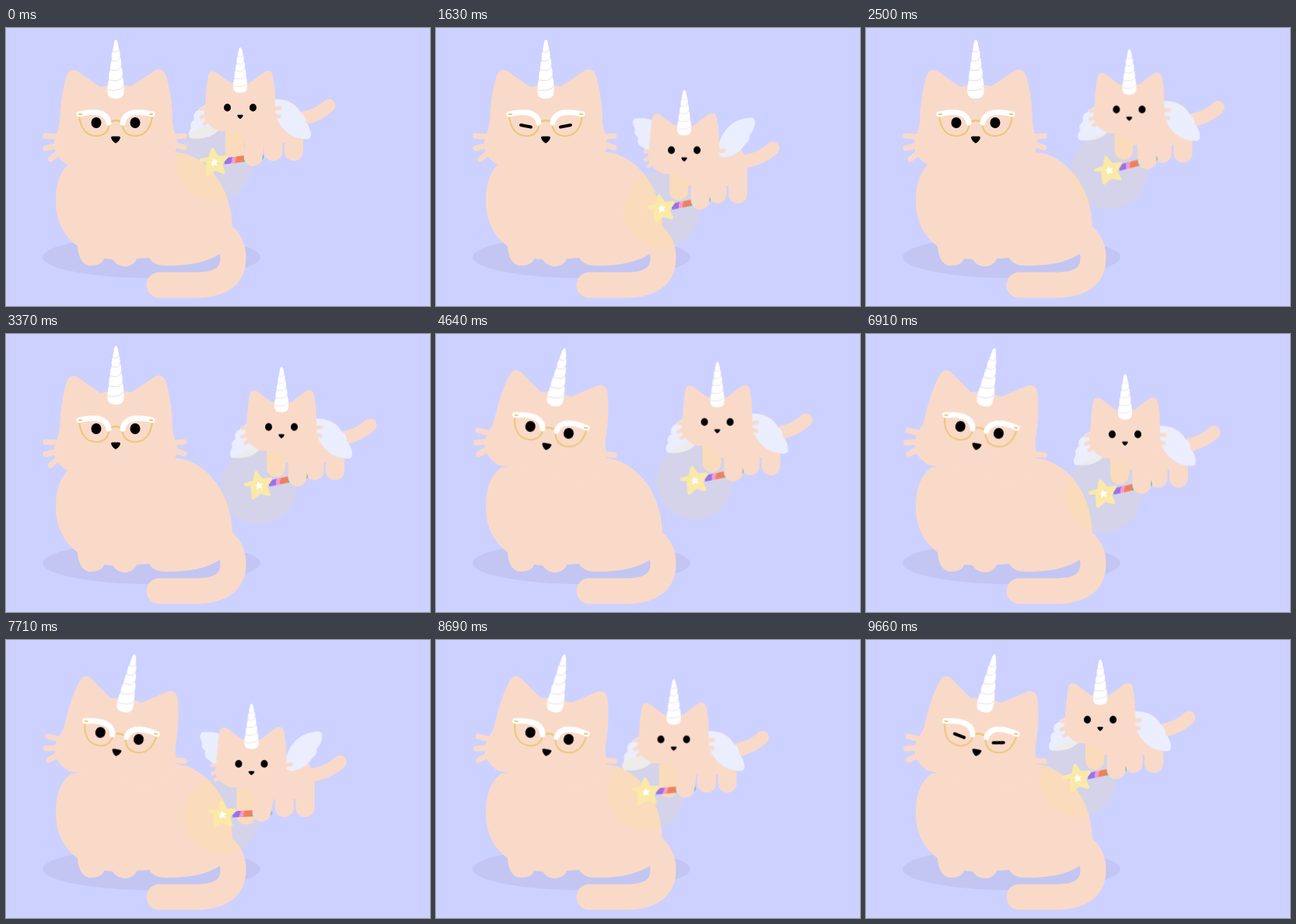
Animation of 545x358 px, one loop 9.76 s. Source, as an HTML page without scripts:

```html
<!DOCTYPE html>
<html lang="en">
<head>
<meta charset="utf-8">
<title>Two unicorn cats</title>
<style>
@property --swing { syntax: "<number>"; inherits: true; initial-value: 0; }
@property --shut { syntax: "<number>"; inherits: true; initial-value: 0; }

html, body { margin: 0; width: 100%; height: 100%; overflow: hidden; background: #cdd1ff; }
svg { display: block; width: 100%; height: 100%; }

.fur { fill: #f9dac9; }
.limb { fill: none; stroke: #f9dac9; stroke-linecap: round; }
.wing { fill: #eaeeff; transform-origin: 301px 102px; animation: flap 1.22s linear infinite; }
.gold { fill: none; stroke: #ebc875; stroke-width: 2.2; }
.brow { fill: none; stroke: #fff; stroke-width: 7; stroke-linecap: round; }
.lid { stroke: #000; stroke-linecap: round; }

.open { opacity: calc(1 - var(--shut)); }
.shut { opacity: var(--shut); }

.head { transform-origin: 135px 150px; animation: tilt 9.76s step-end infinite; }
.big-eyes { animation: blink 9.76s step-end infinite; }
.small-eyes { animation: small-blink 2.44s step-end infinite; }
.drift { animation: drift 9.76s linear infinite; }
.bob { animation: bob 9.76s cubic-bezier(.37, 0, .63, 1) infinite; }
.waver { animation: swing 9.76s cubic-bezier(.37, 0, .63, 1) infinite; }
.arm { transform-origin: 331px 119px; transform: rotate(calc(var(--swing) * 1deg)); }
.leg { transform: translateY(calc(max(0, var(--swing)) * 1.5px)); }

@keyframes tilt {
  0% { transform: none; }
  37.7%, 100% { transform: rotate(10.3deg); }
}
@keyframes blink {
  0%, 6.5%, 18.2%, 30%, 41.7%, 53.5%, 65.2%, 77%, 88.7% { --shut: 0; }
  4.1%, 15.9%, 27.6%, 39.4%, 51.1%, 62.9%, 74.6%, 86.4%, 98.1%, 100% { --shut: 1; }
}
@keyframes small-blink {
  0%, 55%, 100% { --shut: 0; }
  46% { --shut: 1; }
}
@keyframes drift {
  0%, 99%, 100% { transform: none; }
  5.1% { transform: translateX(.5px); }
  10% { transform: translateX(2px); }
  13.3% { transform: translateX(8px); }
  16.7% { transform: translateX(18px); }
  20.5% { transform: translateX(27px); }
  30.4% { transform: translateX(47px); }
  34.5% { transform: translateX(53px); }
  40.6% { transform: translateX(57.5px); }
  47.5% { transform: translateX(60.5px); }
  51.2% { transform: translateX(61.5px); }
  56.4% { transform: translateX(60px); }
  62.5% { transform: translateX(54px); }
  71.9% { transform: translateX(29px); }
  79% { transform: translateX(14.5px); }
  82% { transform: translateX(10.5px); }
  92% { transform: translateX(2px); }
}
@keyframes bob {
  0%, .3%, 12.7%, 25%, 37.4%, 49.8%, 62.1%, 74.5%, 86.9%, 99.2%, 100% { transform: none; }
  4.9%, 17.3%, 29.7%, 42%, 54.4%, 66.8%, 79.1%, 91.5% { transform: translateY(57px); }
}
@keyframes flap {
  0%, 15%, 59%, 100% { transform: none; }
  23%, 51% { transform: scaleY(-1); }
}
@keyframes swing {
  0% { --swing: 4.5; }
  5% { --swing: 10; }
  13%, 17.3%, 34.5%, 47.5%, 62.5%, 73%, 85%, 99%, 100% { --swing: 0; }
  29.7%, 66.8% { --swing: -4; }
  42% { --swing: -2; }
  54.4%, 79% { --swing: 9; }
  91.5% { --swing: 10; }
}
</style>
</head>
<body>
<svg viewBox="0 0 545 358">
  <defs>
    <!-- horn, tip at the origin -->
    <g id="horn">
      <path fill="#fff" d="M-2 3Q0-3 2.500 3L4.500 13Q6 17 5.500 22Q8 28 7 34Q9.500 41 8.500 47Q11 54 10.500 64Q12 76 0 76Q-12 76-10.500 64Q-10.500 56-8.500 51Q-9.500 45-7 38Q-7.500 32-5 26Q-6 20-4 15Z"/>
      <path fill="none" stroke="#dfe0f2" d="M-4 15Q3 18 4.500 12M-5 27Q4 30 5.500 22M-7 39Q5 42 7 34M-8.500 52Q6 55 8.500 47M-10 65Q8 67 10 59"/>
    </g>
    <path id="nose" d="M-6-3Q-6-5-3-4.500H3Q6-5 6-3Q5 2 0 4.500Q-5 2-6-3Z"/>
    <path id="star" d="M0-17L5-6L16.500-5L8 3L10.500 14L0 8.500L-10.500 14L-8-3L-16.500-5L-5-6Z"/>
    <linearGradient id="rainbow" gradientUnits="userSpaceOnUse" x1="0" y1="0" x2="33" y2="12">
      <stop offset=".14" stop-color="#62b99c"/>
      <stop offset=".14" stop-color="#6683e6"/>
      <stop offset=".36" stop-color="#6683e6"/>
      <stop offset=".36" stop-color="#9b72ea"/>
      <stop offset=".58" stop-color="#9b72ea"/>
      <stop offset=".58" stop-color="#f49acb"/>
      <stop offset=".72" stop-color="#f49acb"/>
      <stop offset=".72" stop-color="#f0805c"/>
      <stop offset="1" stop-color="#f0805c"/>
      <stop offset="1" stop-color="#62b99c"/>
    </linearGradient>
  </defs>

  <rect width="545" height="358" fill="#cdd1ff"/>
  <ellipse cx="187" cy="295" rx="140" ry="27" fill="#c3c6f2"/>

  <!-- big cat -->
  <path class="limb" stroke-width="33" d="M197 331H245C276 331 292 319 292 296C292 284 288 275 280 268"/>
  <path class="fur" d="M84 172C70 182 64 200 64 222C64 248 74 268 92 281C93 296 99 306 109 306C119 306 125 302 126 297L137 298C140 303 146 307 153 307C160 307 166 303 168 297L184 296C188 303 196 306 205 306C236 306 258 302 276 290L291 262C292 200 252 162 219 160Z"/>
  <g class="head">
    <path class="fur" d="M84 178C70 172 62 163 62 150C62 140 68 132 69 122C70 100 72 80 78 62C81 53 87 52 94 57L121 76Q141 71 161 75L188 57C196 51 203 53 206 62C211 80 214 100 214 122C215 132 220 140 220 150C220 165 200 178 190 182Z"/>
    <path class="limb" stroke-width="7" d="M51 139L66 140M51 155L66 151M57 169L68 160M217 140L229 139M217 150L229 154"/>
    <use href="#horn" x="141" y="15"/>
    <path class="gold" d="M94 113C96 130 104 139 116 139C126 139 132 133 133 122Q141 116 149 122C150 133 156 139 166 139C178 139 186 130 188 113"/>
    <path class="brow" d="M94 111C110 107 129 106 132 122M188 111C172 107 153 106 150 122"/>
    <path class="gold" stroke-linecap="round" d="M94 111H97M185 111H188"/>
    <g class="big-eyes">
      <g class="open">
        <ellipse cx="116" cy="122" rx="6.500" ry="7"/>
        <ellipse cx="166" cy="122" rx="6.500" ry="7"/>
      </g>
      <path class="lid shut" stroke-width="4" d="M109 125L122 127.500M160 127.500L173 125"/>
    </g>
    <use href="#nose" x="141" y="144"/>
  </g>

  <!-- small flying cat -->
  <g class="drift"><g class="bob"><g class="waver">
    <path class="wing" d="M290 92C268 92 252 100 247 106Q239 109 242 118Q235 122 238 129Q232 137 237 142C258 145 284 138 290 92Z"/>
    <path class="limb" stroke-width="17" d="M370 119C390 115 402 112 415 100"/>
    <path class="limb leg" stroke-width="24" d="M294 130V155"/>
    <path class="limb" stroke-width="24" d="M343.500 135V159M370 130V159"/>
    <path class="fur" d="M282 115L345 93C365 88 382 104 382 125V148H282Z"/>
    <path class="wing" d="M342 92C360 90 374 99 379 109Q386 114 385 121Q392 128 392 139Q391 144 385 143C366 142 346 130 342 92Z"/>
    <g class="arm">
      <circle cx="272" cy="179" r="49" fill="#fbe573" opacity=".15"/>
      <g transform="translate(272 178) rotate(-11.700)">
        <path d="M12-4H60Q63-4 63 0Q63 4 60 4H12Z" fill="url(#rainbow)" transform="translate(1)"/>
        <use href="#star" fill="#fbe9a8" stroke="#fbe9a8" stroke-width="4" stroke-linejoin="round"/>
        <use href="#star" fill="#fff" transform="scale(.34)"/>
      </g>
      <path class="limb" stroke-width="24" d="M322 128L321.500 167"/>
    </g>
    <path class="fur" d="M274 133C260 127 253 118 255 108C257 95 257 75 260 61C262 54 267 54 273 59L289 71Q301 67 313 71L330 58C336 53 341 54 343 61C346 75 346 90 346 104C348 118 342 127 328 133Z"/>
    <path class="limb" stroke-width="5" d="M251 104L258 104M251 115L258 112M255 123L261 119M344 104L352 103M344 112L351 114"/>
    <use href="#horn" transform="translate(301 25) scale(.85 .77)"/>
    <g class="small-eyes">
      <g class="open">
        <ellipse cx="284.500" cy="102.500" rx="4.500" ry="5"/>
        <ellipse cx="317.500" cy="102.500" rx="4.500" ry="5"/>
      </g>
      <path class="lid shut" stroke-width="3" d="M280 102L287.500 103.500M313.500 103.500L321 102"/>
    </g>
    <use href="#nose" transform="translate(301 114.500) scale(.62)"/>
  </g></g></g>
</svg>
</body>
</html>
```
